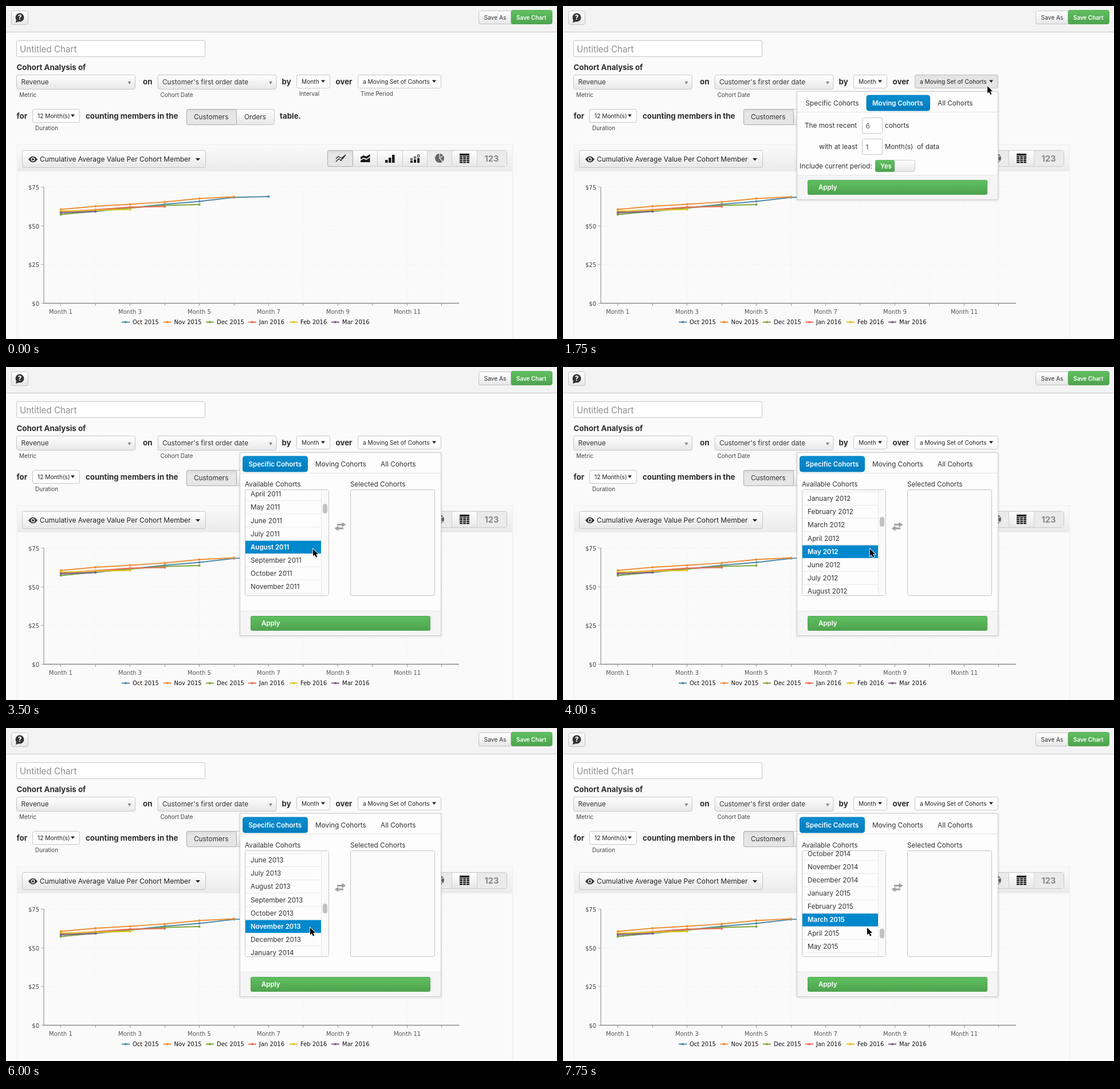
An HTML page that plays this animation: 962 px wide and 582 px high, repeating every 8000 ms.

```html
<!DOCTYPE html>
<html lang="en">
<head>
<meta charset="utf-8">
<title>Cohort analysis</title>
<style>
html, body { margin: 0; width: 100%; height: 100%; overflow: hidden; background: #fafafa; }
svg { display: block; }
text { font-family: Inter, sans-serif; white-space: pre; }
.chart text { font-family: "DejaVu Sans", sans-serif; }
.shadow { filter: drop-shadow(0 1px 2px rgba(0, 0, 0, .13)); }
</style>
</head>
<body>
<svg id="stage" width="962" height="582" viewBox="0 0 962 582">
  <defs>
    <linearGradient id="light" x2="0" y2="1"><stop stop-color="#fff"/><stop offset="1" stop-color="#e7e7e7"/></linearGradient>
    <linearGradient id="pressed" x2="0" y2="1"><stop stop-color="#d9d9d9"/><stop offset=".25" stop-color="#e6e6e6"/><stop offset="1" stop-color="#e6e6e6"/></linearGradient>
    <linearGradient id="bar" x2="0" y2="1"><stop stop-color="#fafafa"/><stop offset="1" stop-color="#ebebeb"/></linearGradient>
    <linearGradient id="green" x2="0" y2="1"><stop stop-color="#60c060"/><stop offset="1" stop-color="#4ea24e"/></linearGradient>
    <linearGradient id="blue" x2="0" y2="1"><stop stop-color="#0a8dd0"/><stop offset="1" stop-color="#007dbd"/></linearGradient>
  </defs>
  <g id="page"></g>
  <g id="overlay"></g>
</svg>
<script>
const LOOP = 8000, STEP = 250, ROW = 23.1;
const MONTHS = ['January', 'February', 'March', 'April', 'May', 'June', 'July',
  'August', 'September', 'October', 'November', 'December'];

// time, x, y of the pointer tip
const POINTER = [[500, 831, 110], [1000, 833, 118], [1250, 775, 132], [1500, 741, 140], [2000, 741, 140],
  [2250, 690, 150], [2500, 575, 163], [2750, 485, 171], [3000, 485, 171], [3250, 525, 285],
  [3500, 536, 318], [4250, 536, 318], [4750, 531, 349]];
// time, y of the "January 2012" row
const SCROLL = [[3000, 630], [3250, 560], [3500, 430], [3750, 318], [4000, 230],
  [5250, -6.5], [6750, -316.9], [7750, -542.6]];

const text = (x, y, str, size = 11.8, fill = '#333', weight = 400, anchor = 'start') =>
  `<text x="${x}" y="${y}" font-size="${size}" fill="${fill}" font-weight="${weight}" text-anchor="${anchor}">${str}</text>`;
const bold = (x, y, str, size = 11.5, fill = '#fff') => text(x, y, str, size, fill, 600);
const heading = (x, y, str) => text(x, y, str, 13.3, '#2d2d2d', 700);
const caption = (x, y, str) => text(x, y, str, 10, '#444');
const rect = (x, y, w, h, fill, stroke = 'none', r = 0) =>
  `<rect x="${x}" y="${y}" width="${w}" height="${h}" fill="${fill}" stroke="${stroke}" rx="${r}"/>`;
const path = (d, stroke, width = 1, fill = 'none') =>
  `<path d="${d}" stroke="${stroke}" stroke-width="${width}" fill="${fill}"/>`;
const fillPath = (d, fill) => path(d, 'none', 0, fill);
const caret = (x, y, w = 7, h = 4.5, fill = '#222') => fillPath(`M${x} ${y}h${w}l${-w / 2} ${h}z`, fill);

function track(keys, t) {
  const next = keys.findIndex(k => k[0] > t);
  if (next < 0) return keys[keys.length - 1].slice(1);
  if (next === 0) return keys[0].slice(1);
  const a = keys[next - 1], b = keys[next], p = (t - a[0]) / (b[0] - a[0]);
  return a.slice(1).map((v, i) => v + (b[i + 1] - v) * p);
}

function header() {
  return rect(0, 0, 962, 45, '#f3f3f3') + path('M0 45.5H962', '#c9c9c9') +
    rect(9.5, 8.5, 29, 24, 'url(#light)', '#c4c4c4', 3) +
    `<circle cx="24" cy="20" r="7.5" fill="#333"/>` + fillPath('M18 24l-1 5 6-2z', '#333') +
    text(24, 24.2, '?', 11.5, '#fff', 800, 'middle') +
    rect(825.5, 8.5, 60, 23, 'url(#light)', '#c4c4c4', 3) + text(834.5, 23.5, 'Save As', 10.2) +
    rect(882, 7.5, 71.5, 24, 'url(#green)', '#52a852', 3) + bold(891, 23.5, 'Save Chart', 9.9);
}

function form() {
  const select = (x, label, note) => rect(x + .5, 120.5, 207, 25, 'url(#light)', '#c6c6c6', 3) +
    text(x + 8.5, 136.5, label) + caret(x + 194.5, 132, 6, 5, '#888') + caption(x + 5, 159, note);
  const small = (x, y, w, label, note, noteX) => rect(x + .5, y + .5, w, 23, '#fdfdfd', '#c6c6c6', 3) +
    text(x + 9, y + 16, label, 10.2, '#222') + caret(x + w - 15, y + 9.5) + caption(noteX, y + 37, note);
  return rect(18.5, 60.5, 329, 28, '#fff', '#c6c6c6', 2) + text(24, 80.5, 'Untitled Chart', 15.2, '#8d8d8d') +
    heading(18.5, 112, 'Cohort Analysis of') +
    select(18, 'Revenue', 'Metric') + heading(239, 137, 'on') +
    select(264.5, 'Customer\'s first order date', 'Cohort Date') + heading(481.5, 137, 'by') +
    small(507, 120, 58, 'Month', 'Interval', 512) + heading(575.5, 137, 'over') +
    small(614, 120, 145, 'a Moving Set of Cohorts', 'Time Period', 619) +
    heading(18.5, 197, 'for') + small(46, 180, 82, '12 Month(s)', 'Duration', 51) +
    heading(139, 197, 'counting members in the') +
    rect(315.5, 180.5, 153, 27, 'url(#light)', '#c4c4c4', 3) +
    rect(315.5, 180.5, 87, 27, 'url(#pressed)', '#aaa', 3) +
    text(328, 197.5, 'Customers') + text(416, 197.5, 'Orders') + heading(478, 197, 'table.');
}

function toolbar() {
  const ink = '#1a1a1a', bars = (x, heights) =>
    heights.map((h, i) => rect(x + i * 6, 274 - h, 4.5, h, ink)).join('');
  let cells = '';
  for (let i = 0; i < 12; i++) cells += rect(792 + i % 3 * 6, 262.5 + Math.floor(i / 3) * 3.2, 5, 2.3, ink);
  return rect(19.5, 242.5, 865, 360, '#fafafa', '#eee') + rect(20, 243, 864, 46, 'url(#bar)') +
    rect(28.5, 252.5, 320, 30, 'url(#light)', '#c4c4c4', 3) +
    fillPath('M39 268q8-10.5 16 0q-8 10.5-16 0z', '#333') +
    `<circle cx="47" cy="268" r="3.4" fill="#f2f2f2"/><circle cx="47" cy="268" r="2" fill="#333"/>` +
    text(59, 271.5, 'Cumulative Average Value Per Cohort Member', 12, '#222') + caret(331, 266, 8, 4.5) +
    rect(561.5, 252.5, 313, 28, 'url(#light)', '#c8c8c8', 3) +
    rect(735, 253, 43, 27, '#ebebeb') + rect(822, 253, 52, 27, '#ebebeb') +
    rect(561.5, 252.5, 44, 28, 'url(#pressed)', '#aaa', 3) +
    path('M648.5 253v27M692.5 253v27M735.5 253v27M778.5 253v27M822.5 253v27', '#cfcfcf') +
    path('M576 272l5-5 4 3 8-10M576 267l4-4 6 3 6-5', ink, 1.3) +
    fillPath('M619 264l5-3 5 2 6.5-4v4l-6 4-5-2-5.5 3zM619 270l5-3 5 2 6.5-4v8h-16.5z', ink) +
    bars(662, [5, 9, 14]) +
    rect(706, 270, 4, 4, ink) + path('M706.5 268.5h3v-2h-3z', ink) + rect(712, 268, 4, 6, ink) +
    path('M712.5 266v-2.5h3v2.5z', ink) + rect(718, 266, 4, 8, ink) + path('M718.5 264v-4h3v4z', ink) +
    `<circle cx="757" cy="266" r="8" fill="#666"/>` + path('M757 257v9l6 6.5M757 266l7-5', '#ebebeb', 1.3) +
    rect(792, 258, 17, 3.5, ink) + cells + text(835.5, 272, '123', 14.5, '#888', 700);
}

function chart() {
  const monthX = i => 95.8 + i * 60.45;
  const series = [
    ['Oct 2015', '#4f8aa8', 202, [364, 359, 353, 346.5, 341.5, 334.5, 333]],
    ['Nov 2015', '#ee8f34', 274.5, [355.5, 350, 346.5, 342.5, 336.5, 333.5]],
    ['Dec 2015', '#7fa63a', 349, [364.5, 358, 353, 348.5, 347]],
    ['Jan 2016', '#ee6b55', 423, [359.5, 356, 351.5, 350.5]],
    ['Feb 2016', '#e3c51f', 495, [358.5, 357, 355.5]],
    ['Mar 2016', '#84588c', 568, [361, 359]]];
  let out = '';
  for (let i = 0; i < 4; i++) {
    const y = 316.5 + Math.round(i * 67.6);
    out += `<path d="M66 ${y}H791" stroke="#f0f0f0" stroke-dasharray="2 2"/>` + path(`M61 ${y}h5`, '#aaa') +
      text(58, y + 4.8, '$' + (75 - 25 * i), 10, '#444', 400, 'end');
  }
  for (let i = 0; i < 12; i++) {
    const x = Math.floor(monthX(i)) + .5;
    out += `<path d="M${x} 316V519" stroke="#f2f2f2" stroke-dasharray="2 2"/>` + path(`M${x} 519v5`, '#999');
    if (i % 2 === 0) out += text(x, 538, 'Month ' + (i + 1), 10, '#555', 400, 'middle');
  }
  out += path('M66 316V519', '#aaa', 1.5) + path('M65 519.5H791', '#8a8a8a', 1.7);
  for (const [name, color, x, ys] of series) {
    out += path('M' + ys.map((y, i) => `${monthX(i)} ${y}`).join('L'), color, 1.8) +
      ys.map((y, i) => `<circle cx="${monthX(i)}" cy="${y}" r="2.1" fill="${color}"/>`).join('') +
      path(`M${x} 552.5h14`, color, 2) + `<circle cx="${x + 7}" cy="552.5" r="2.1" fill="${color}"/>` +
      text(x + 19, 556, name, 10, '#111');
  }
  return `<g class="chart">${out}</g>`;
}

function tab(x, w, label, active) {
  return active ? rect(x + .5, 156, w - 1, 27, 'url(#blue)', '#0680c0', 4) + bold(x + 10.5, 173.5, label)
    : text(x + 10.5, 173.5, label);
}

function popup(bottom, specific, moving, body) {
  return `<g class="shadow">${rect(408.5, 149.5, 351, bottom - 150, '#fdfdfd', '#cdcdcd')}</g>` +
    path('M409 185.5H759', '#e2e2e2') +
    rect(409, bottom - 44, 350, 43, '#f5f5f5') + path(`M409 ${bottom - 43.5}H759`, '#e5e5e5') +
    rect(427.5, bottom - 34.5, 313, 25, 'url(#green)', '#52a852', 2) + bold(446, bottom - 18, 'Apply') +
    tab(413, 114, 'Specific Cohorts', specific) + tab(529.5, 111.5, 'Moving Cohorts', moving) +
    tab(643.5, 83, 'All Cohorts', false) + body;
}

function movingBody() {
  const input = (y, value) => rect(522.5, y + .5, 35, 27, '#fff', '#c6c6c6', 2) + text(528.5, y + 18.5, value, 12, '#555');
  return text(422, 213, 'The most recent') + input(195, '6') + text(562, 212.5, 'cohorts') +
    text(447, 250, 'with at least') + input(232, '1') + text(562, 249.5, 'Month(s)', 11.5) + text(618, 249.5, 'of data') +
    text(413, 284, 'Include current period:') +
    rect(545.5, 269.5, 69, 20, 'url(#light)', '#ccc', 3) + rect(545, 269, 34, 21, 'url(#green)', 'none', 3) +
    bold(554, 283.5, 'Yes', 11.3);
}

function specificBody(t, pointerY) {
  const [januaryY] = track(SCROLL, t);
  let rows = '';
  for (let i = Math.floor((200 - januaryY) / ROW); januaryY + i * ROW < 415; i++) {
    const y = januaryY + i * ROW, label = `${MONTHS[(i % 12 + 12) % 12]} ${2012 + Math.floor(i / 12)}`;
    const hovered = Math.abs(pointerY - 3 - y) < ROW / 2;
    rows += path(`M418 ${y + 11.5}h132`, '#e8e8e8') +
      (hovered ? rect(418, y - 10.8, 132, 22.3, '#08c') + bold(427, y + 4.2, label) : text(427, y + 4.2, label));
  }
  const thumbY = 262 + (230 - januaryY) * .1148;
  return text(417, 208.5, 'Available Cohorts') + text(601, 208.5, 'Selected Cohorts') +
    rect(417.5, 214.5, 146, 185, '#fdfdfd', '#c4c4c4', 3) +
    `<svg x="418" y="215" width="145" height="184" viewBox="418 215 145 184">${rows}</svg>` +
    rect(550, 215, 13, 184, '#fafafa') + path('M550.5 215v184', '#e6e6e6') +
    rect(553, thumbY, 8, 17, '#c1c1c1', 'none', 4) +
    rect(601.5, 214.5, 147, 185, '#fbfbfb', '#c4c4c4', 3) +
    fillPath('M578 274h8.5v-3l7 4.5-7 4.5v-3h-8.5zM589 283.5h-8.5v3l-7-4.5 7-4.5v3h8.5z', '#a0a0a0');
}

function overlay(t) {
  if (t < 500) return '';
  const [x, y] = track(POINTER, t);
  let out = '';
  if (t >= 1500 && t < 2250)
    out += rect(614.5, 120.5, 145, 23, '#e4e4e4', '#bbb', 3) +
      text(623, 136, 'a Moving Set of Cohorts', 10.2, '#222') + caret(744, 129.5);
  if (t >= 3000) out += popup(470, true, false, specificBody(t, y));
  else if (t >= 1750) out += popup(339, t >= 2750, true, movingBody());
  return out + `<path transform="translate(${x} ${y})" d="M0 0v12.5l2.9-2.6 2.2 4.9 2.3-1-2.2-4.8h3.9z"
    fill="#000" stroke="#fff" stroke-width="1.6" paint-order="stroke"/>`;
}

const overlayLayer = document.getElementById('overlay');
document.getElementById('page').innerHTML = header() + form() + toolbar() + chart();

let shown = -1;
function frame() {
  const t = Math.floor(performance.now() % LOOP / STEP) * STEP;
  if (t !== shown) overlayLayer.innerHTML = overlay(shown = t);
  requestAnimationFrame(frame);
}
frame();
</script>
</body>
</html>
```
